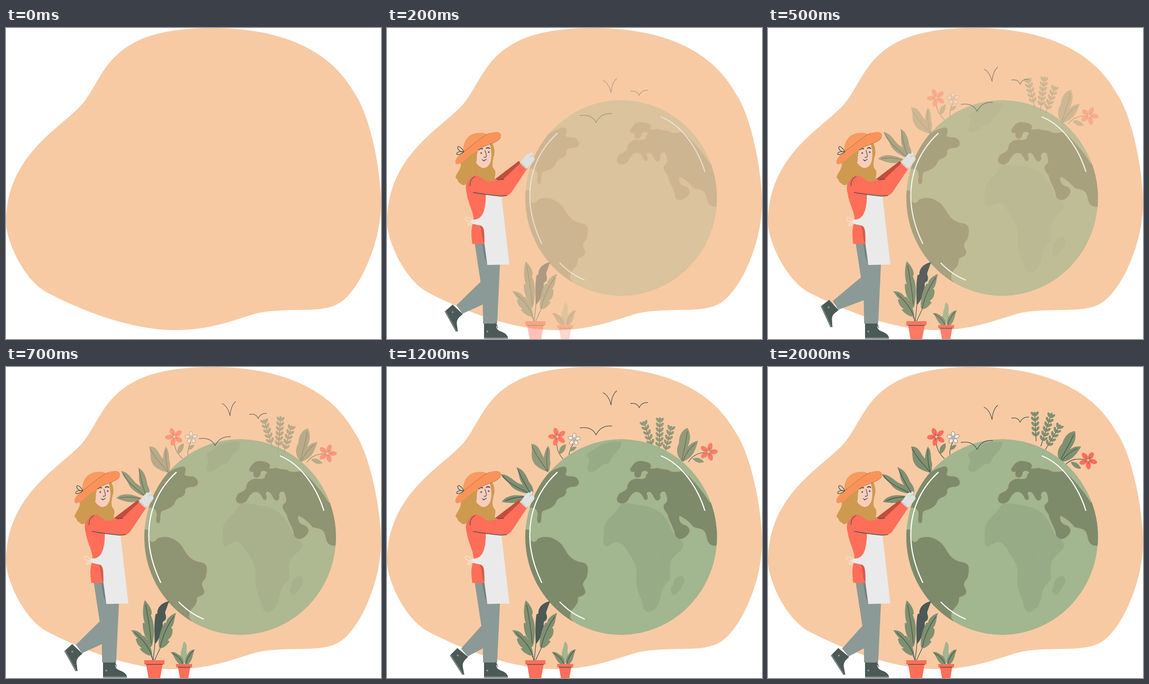
Recreate the animation shown at these times as an HTML page. Size 800x664 px, loop 2500 ms.

```html
<!DOCTYPE html>
<html lang="en">
<head>
<meta charset="utf-8">
<title>Gardener and globe</title>
<style>
html, body { margin: 0; width: 100%; height: 100%; overflow: hidden; background: #fff; }
svg { display: block; width: 100%; height: 100%; }
.line { fill: none; stroke: #45524f; stroke-width: 1.3; stroke-linecap: round; stroke-linejoin: round; }
.leaf { fill: #7f9070; }
.red { fill: #ff6e59; }
.dark { fill: #4b5957; }
.cloth { fill: #8b9a96; }
.land { fill: #7d8b6a; stroke: #c2a584; stroke-width: .8; }
.soft { fill: #98ab87; }
.shine { fill: none; stroke: #fff; stroke-width: 2.4; stroke-linecap: round; }
</style>
</head>
<body>
<svg viewBox="0 0 800 664">
  <defs><clipPath id="disc"><ellipse cx="499.5" cy="363" rx="204.5" ry="209"/></clipPath></defs>
  <path fill="#f7caa4" d="M440,0C580,0 690,42 744,140C775,184 800,300 800,374C800,462 752,565 708,589C667,612 590,593 525,612C480,626 430,645 362,645C258,645 150,597 88,565C35,537 0,450 0,415C0,270 118,214 164,161C198,118 208,66 274,31C318,7 380,0 440,0Z"/>

  <g id="leftBed">
    <path class="leaf" d="M305,170C325,168 325,190 340,200C350,210 352,220 347,226C330,222 316,215 312,205C306,195 310,182 305,170Z"/>
    <path class="leaf" d="M341,170C350,180 346,195 350,205C351,215 348,222 345,225C331,205 334,185 341,170Z"/>
    <path class="line" d="M308,175C318,195 330,205 346,225M341,176C340,195 342,210 346,224M359,158C359,174 367,187 376,195M394,161C389,170 387,178 388,188"/>
    <path class="leaf" d="M379,163C368,166 364,174 367,186C376,182 380,174 379,163ZM402,166C392,166 388,171 388,177C396,177 400,173 402,166Z"/>
    <g id="leftFlowers"></g>
  </g>
  <g id="rightBed">
    <g id="twigs"></g>
    <path class="leaf" d="M655,137C640,138 632,150 628,163C616,175 616,190 623,202C634,196 640,186 645,174C655,162 658,150 655,137ZM668,170C650,167 638,180 632,190L624,203C645,201 655,192 668,170Z"/>
    <path class="leaf" d="M646,203C655,201 663,206 668,217C657,218 650,213 646,203Z"/>
    <path class="line" d="M652,144C644,165 632,182 623,201M660,174C645,180 634,190 625,202M636,207C648,196 661,195 678,198"/>
    <g id="rightFlower"></g>
  </g>

  <g clip-path="url(#disc)">
    <g id="globe">
      <ellipse fill="#a2b68f" cx="499.5" cy="363" rx="204.5" ry="209"/>
      <path class="land" d="M375,212C386,211 384,222 381,230C388,236 396,230 404,236C413,244 411,254 400,256C388,256 380,260 383,266C380,282 368,275 362,286C358,300 344,304 332,308C328,316 331,326 328,332C322,337 318,330 321,318C322,306 316,300 308,301L280,300L300,250L360,217Z"/>
      <path class="land" d="M280,346L304,347C310,352 300,362 306,366C308,376 318,375 322,366C340,358 358,364 372,378C384,392 386,410 412,416C432,418 430,432 427,446C426,456 414,458 420,470C428,484 420,488 408,492C408,512 396,512 392,526C390,534 391,538 397,542L340,560L270,460Z"/>
      <path class="land" d="M522,213C526,204 536,198 546,201C556,202 566,206 563,214C556,218 572,216 578,215C588,220 596,216 604,222C614,226 622,222 632,222C648,236 672,262 688,288L720,300L712,381L697,382C680,378 684,364 678,352C672,344 662,345 654,342C644,330 634,322 624,318C622,330 628,336 638,338C648,344 648,354 638,362C630,370 616,370 614,358C612,342 602,332 598,314C590,304 588,300 591,293C602,288 596,276 594,268C586,262 580,272 584,278C580,290 572,286 568,276C564,266 556,264 554,270C560,282 554,288 548,282C544,272 538,264 528,268C516,274 518,286 508,290C496,296 486,286 492,276C494,266 508,268 512,258C512,246 522,238 535,238C545,240 555,238 552,230C560,226 556,222 548,222C540,224 546,232 538,236C528,238 526,230 528,224C518,226 516,218 522,213Z"/>
      <g id="africa">
        <path class="soft" d="M500,292C515,288 530,295 548,296C565,300 580,305 592,320C604,334 606,350 614,360C624,368 634,374 632,382C628,394 612,402 606,414C600,430 606,446 602,456C590,466 586,476 584,488C580,510 570,522 558,523C548,522 546,514 544,500C538,484 530,470 532,450C534,432 530,420 522,408C512,392 508,380 494,374C482,372 474,384 466,383C460,378 462,360 463,342C468,324 482,318 490,306Z"/>
        <path class="soft" d="M623,447C632,444 636,452 634,462C626,470 622,486 612,487C604,484 604,474 610,466C610,456 616,450 623,447Z"/>
        <path class="soft" d="M500,163C498,175 490,182 482,190C474,200 478,206 466,207C456,208 450,222 436,224C426,224 426,214 430,206C436,200 424,190 428,184C440,178 446,172 456,166C470,160 486,158 500,160Z"/>
        <path d="M572,396L578,404" stroke="#c9a184"/>
      </g>
    </g>
    <path id="shine" class="shine" d="M363,225C304,280 284,365 330,460M585,190C625,206 660,250 678,306M369,502Q392,526 421,538"/>
  </g>

  <g id="birds">
    <path class="line" d="M461,86C470,90 475,100 478,112C479,100 482,88 490,82M520,109Q534,107 538,118Q543,106 556,107M412,161Q437,157 446,176Q456,155 479,157"/>
  </g>

  <g id="sprig">
    <path class="leaf" d="M242,229C259,228 268,242 280,248C296,254 308,262 306,271C290,270 270,263 263,252C256,243 249,240 242,229Z"/>
    <path class="leaf" d="M275,214C291,217 298,233 303,245C312,256 314,264 310,274C296,267 290,252 285,243C280,232 282,222 275,214Z"/>
    <path class="leaf" d="M245,288C252,276 270,270 297,276C290,290 270,293 245,288Z"/>
    <path class="line" d="M247,233C262,252 282,258 302,269M279,219C288,240 296,254 307,271M252,286C266,279 280,278 295,277"/>
  </g>

  <g id="pot1">
    <path class="line" d="M303,585Q310,605 313,626M306,608L314,626M318,588L314,626M330,598L317,626"/>
    <path class="leaf" d="M296,498C306,508 311,518 311,526L309,530C315,543 318,560 313,590C311,602 304,600 299,584L302,582C294,573 291,557 292,546L296,547C291,533 291,512 296,498Z"/>
    <path class="dark" d="M348,500C332,503 322,514 323,526L319,528C315,550 317,573 317,592C325,585 331,571 330,565L333,562C336,553 333,548 335,544L340,540C344,531 338,528 340,522Z"/>
    <path class="leaf" d="M363,525C349,530 341,540 342,546L338,546C328,563 324,588 327,599C334,603 343,595 349,586L345,583C355,576 356,566 355,559L352,557C360,549 358,538 363,525Z"/>
    <path class="leaf" d="M267,562C279,561 289,568 291,574L295,574C305,584 311,602 312,616C303,618 290,609 285,601L290,600C280,594 278,586 277,580L281,579C274,574 272,568 267,562Z"/>
    <path class="line" d="M298,508C303,535 308,565 310,590M358,533C342,555 333,580 329,598M275,567C293,583 304,598 310,613"/>
    <path class="red" d="M295,626H338V635H334L329,664H304L299,635H295Z"/>
    <path class="line" d="M299,635H334"/>
  </g>
  <g id="pot2">
    <path fill="#a2b68f" d="M380,586C390,594 383,604 386,612C388,620 384,628 380,633C370,618 373,608 375,602C378,596 376,592 380,586Z"/>
    <path class="leaf" d="M351,609C362,606 367,615 372,616C378,622 379,628 379,634H370C360,628 360,616 351,609ZM403,603C392,603 388,612 385,618C381,625 382,630 382,634H389C399,626 397,614 403,603Z"/>
    <path class="line" d="M355,611Q372,620 377,633M399,606Q386,620 384,633"/>
    <path class="red" d="M363,634H397V641H393L389,664H371L367,641H363Z"/>
    <path class="line" d="M367,641H393"/>
  </g>

  <g id="person">
    <g id="backLeg">
      <path class="cloth" d="M158,601L201,553L224,529V590L204,601L172,618Z"/>
      <path class="dark" d="M150,600L173,619C164,627 160,632 162,642L165,657L160,656L136,614Z"/>
      <path d="M135,615L162,657" stroke="#77847f" stroke-width="3"/>
      <circle cx="151" cy="616" r="2" fill="#8b9a96"/>
    </g>
    <path class="cloth" d="M187,459H212L220,500L241,504L235,631H205L204,565L201,551Z"/>
    <path fill="#72827e" d="M203,460H210L215,506L208,490Z"/>
    <path class="dark" d="M207,631H233C232,640 235,645 243,648C252,651 257,656 258,661H207Z"/>
    <path d="M207,662H258" stroke="#77847f" stroke-width="3"/>
    <path class="line" d="M232,630L236,640M230,637L235,634"/>
    <circle cx="214" cy="648" r="2" fill="#8b9a96"/>

    <path fill="#c44c3d" d="M230,323L281,284L289,291L249,328Z"/>
    <path class="red" d="M182,317C169,324 166,338 170,353C174,380 188,397 184,415C178,432 180,446 182,461H215L214,350L222,320Z"/>
    <path fill="#d95a49" d="M198,421L208,424V460C200,450 204,434 198,421Z"/>
    <path fill="#eaeaea" d="M211,353L244,357L261,505L214,506L208,462C208,432 207,425 200,422L182,418L181,409C198,410 211,402 211,353Z"/>
    <path d="M182,413C174,402 166,402 167,408C169,413 177,414 182,413C174,416 170,420 174,422C179,420 181,417 182,413" fill="none" stroke="#f5e4d8" stroke-width="1.5"/>
    <path fill="#cd9a50" d="M184,250C166,262 158,276 157,288C160,300 148,309 146,320C152,322 150,330 157,332C160,337 166,336 171,332C176,318 188,314 200,318C208,326 220,330 233,325C226,320 234,314 230,304C222,297 226,284 227,276C233,262 226,242 216,236Z"/>
    <path class="red" d="M178,320C187,311 198,316 209,320C224,325 238,326 249,322L284,289L300,299L268,347C262,357 254,361 242,359L180,351Z"/>
    <path fill="#cd9a50" d="M186,295C180,312 198,316 210,326C218,331 226,325 233,326C226,319 234,313 230,304L220,290Z"/>
    <path class="line" d="M177,337C177,327 181,320 188,317M184,351C205,355 222,357 242,359L255,358M249,323L237,324"/>
    <path fill="#f9cdbb" d="M187,259C196,252 206,240 215,238C221,248 224,266 222,280C220,293 213,299 205,299C196,297 188,288 187,277Z"/>
    <path fill="#cd9a50" d="M185,252C194,250 205,241 214,236C208,249 195,256 193,265C190,275 194,284 188,290L180,278Z"/>
    <path class="line" d="M209,261Q212,270 212,274Q211,277 207,276M203,281Q207,285 212,280"/>
    <path d="M196,260Q200,256 204,258M212,257Q215,254 219,257" class="line" style="stroke-width:2.2"/>
    <g class="dark"><circle cx="201" cy="267" r="1.8"/><circle cx="217" cy="265" r="1.8"/><path d="M204,282H210L206,285Z"/></g>
    <path fill="#f99a60" d="M162,266C162,242 172,226 194,224C207,223 213,226 218,230L228,240L176,272Z"/>
    <path fill="#f9935a" d="M218,225C232,220 245,221 243,231C239,246 215,246 194,259C176,271 162,291 149,291C142,288 147,275 162,265C182,252 198,234 218,225Z"/>
    <path class="line" style="stroke:#bd6a3d;stroke-width:1" d="M162,265C182,252 198,234 218,225M242,234C236,246 214,247 194,260"/>
    <path class="line" d="M164,264C156,251 150,251 151,257C153,263 159,265 164,264C153,263 147,266 149,270C154,271 160,268 164,264"/>
    <path fill="#e0e2df" d="M283,288C290,284 291,276 296,273C298,269 302,266 305,269C306,264 311,264 311,269L309,275C316,274 316,281 312,285C308,291 304,295 297,301Z"/>
    <path class="line" style="stroke:#a9afab;stroke-width:1" d="M285,288Q292,292 297,299M304,276L309,272"/>
  </g>
</svg>
<script>
const el = id => document.getElementById(id);
const show = (id, value) => el(id).setAttribute('opacity', value);
const move = (id, value) => el(id).setAttribute('transform', value);

// Piecewise linear value through [time, value] pairs
function mix(t, keys) {
  if (t <= keys[0][0]) return keys[0][1];
  for (let i = 1; i < keys.length; i++) {
    const [a, u] = keys[i - 1], [b, v] = keys[i];
    if (t <= b) return u + (v - u) * (t - a) / (b - a);
  }
  return keys[keys.length - 1][1];
}

function flower(x, y, size, paint, turn) {
  let s = '';
  for (let i = 0; i < 5; i++) {
    const at = `translate(${x} ${y}) rotate(${turn + i * 72})`;
    s += `<g transform="${at}"><ellipse cx="${size * .58}" rx="${size * .46}" ry="${size * .27}" ${paint}/>` +
      `<path class="line" style="stroke-width:.8" d="M0,0H${size * .42}"/></g>`;
  }
  return s + `<circle cx="${x}" cy="${y}" r="1.8" fill="#f7dcc4"/>`;
}

function twig(x1, y1, x2, y2, pairs) {
  const angle = Math.atan2(y2 - y1, x2 - x1) * 180 / Math.PI;
  const length = Math.hypot(x2 - x1, y2 - y1);
  let s = `<g transform="translate(${x1} ${y1}) rotate(${angle})"><path class="line" d="M0,0H${length - 5}"/>`;
  for (let i = 0; i < pairs; i++) {
    const x = length * (.16 + .7 * i / (pairs - 1));
    for (const side of [-1, 1])
      s += `<ellipse class="leaf" transform="translate(${x} 0) rotate(${side * 38})" cx="7" rx="5.8" ry="2.9"/>`;
  }
  return s + `<ellipse class="leaf" cx="${length - 4}" rx="5.5" ry="2.8"/></g>`;
}

el('leftFlowers').innerHTML = flower(359, 149, 19, 'fill="#ff6e59"', -40) +
  flower(395, 151, 13, 'fill="#fbf5ee" stroke="#45524f" stroke-width=".7"', -20);
el('rightFlower').innerHTML = flower(683, 199, 19, 'fill="#ff6e59"', 15);
el('twigs').innerHTML = twig(572, 158, 569, 97, 5) + twig(582, 169, 605, 99, 6) + twig(592, 176, 623, 124, 5);

const lift = [[100, 30], [200, 26], [300, 18], [500, 2], [600, -2], [700, -8], [800, -16],
  [1000, -22], [1200, -31], [1400, -39], [1600, -25], [1800, -13], [2000, 0]];
const kick = [[100, .25], [200, .5], [400, .93], [500, 1], [600, .7], [700, .44],
  [800, .36], [1000, .17], [1200, 0], [1600, -.16], [1800, -.1], [2000, 0]];

function draw(time) {
  // The picture steps every 100 ms, later every 200 ms, then rests
  const step = time < 800 ? 100 : 200;
  const t = Math.min(2000, Math.floor(time / step) * step);
  const on = t > 0 ? 1 : 0;
  const globe = on * mix(t, [[100, .2], [200, .33], [500, .65], [700, .85], [1000, 1]]);
  const beds = mix(t, [[200, 0], [500, .32], [700, .52], [1200, .82], [1600, 1]]);

  show('person', on * mix(t, [[100, .6], [200, 1]]));
  show('globe', globe);
  show('africa', mix(t, [[200, 0], [500, .55], [1000, 1]]));
  show('shine', on * Math.min(1, globe + .2));
  show('birds', on * mix(t, [[100, .25], [200, .4], [500, .62], [700, .8], [1200, 1]]));
  show('pot1', on * mix(t, [[100, .2], [200, .42], [500, .93], [600, 1]]));
  show('pot2', on * mix(t, [[100, .08], [200, .28], [500, .88], [600, 1]]));
  show('sprig', mix(t, [[200, 0], [500, .62], [700, .8], [1200, 1]]));
  show('leftBed', beds);
  show('rightBed', beds);

  const k = mix(t, kick);
  move('backLeg', `translate(${-11 * k} ${-11 * k}) rotate(${8 * k} 206 535)`);
  move('birds', `translate(0 ${mix(t, lift)})`);
  move('sprig', `rotate(${mix(t, [[500, 14], [700, 13], [1000, 5], [1200, 0]])} 275 242)`);
  move('leftBed', `rotate(${mix(t, [[700, 0], [1200, 6], [1600, 13], [2000, 0]])} 362 192)`);
  move('rightBed', `rotate(${mix(t, [[200, -6], [500, -11], [700, -14], [1200, -17], [1600, -10], [2000, 0]])} 625 180)`);
}

const start = performance.now();
function tick() {
  draw((performance.now() - start) % 2500);
  requestAnimationFrame(tick);
}
tick();
</script>
</body>
</html>
```
